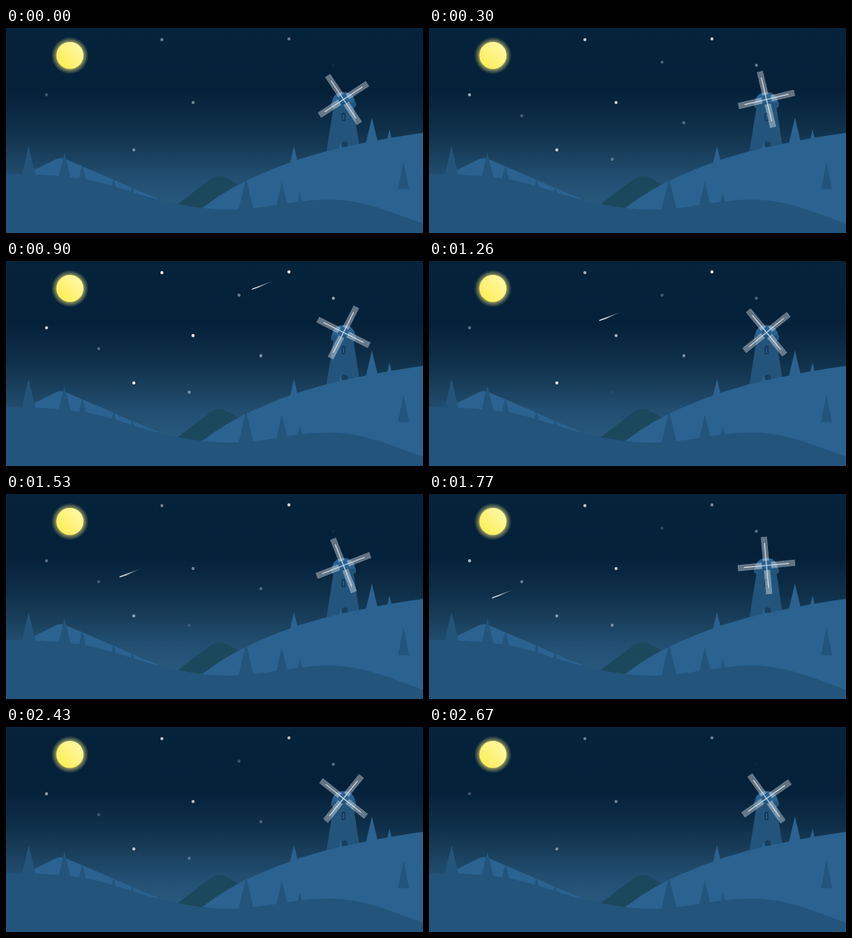
Write an HTML page that moves like this. It is 535 px wide and 264 px high and loops after 2.7 s.

```html
<!DOCTYPE html>
<html lang="en">
<head>
<meta charset="utf-8">
<title>Windmill at night</title>
<style>
html, body { margin: 0; width: 100%; height: 100%; overflow: hidden; background: #05223a; }
svg { display: block; width: 100vw; height: 100vh; }
</style>
</head>
<body>
<svg viewBox="0 0 535 264" preserveAspectRatio="none">
  <defs>
    <linearGradient id="sky" gradientUnits="userSpaceOnUse" x1="0" y1="0" x2="0" y2="240">
      <stop offset="0" stop-color="#05233b"/>
      <stop offset=".34" stop-color="#05213a"/>
      <stop offset=".54" stop-color="#0f304a"/>
      <stop offset=".67" stop-color="#193f5c"/>
      <stop offset=".8" stop-color="#224e70"/>
      <stop offset=".89" stop-color="#255579"/>
      <stop offset="1" stop-color="#2b5a7e"/>
    </linearGradient>
    <radialGradient id="glow">
      <stop offset=".7" stop-color="#f5e96a" stop-opacity=".65"/>
      <stop offset=".86" stop-color="#d9d27a" stop-opacity=".3"/>
      <stop offset="1" stop-color="#d9d27a" stop-opacity="0"/>
    </radialGradient>
    <linearGradient id="moon" x1=".85" y1=".2" x2=".15" y2=".85">
      <stop offset="0" stop-color="#fff7a0"/>
      <stop offset="1" stop-color="#fdee58"/>
    </linearGradient>
    <linearGradient id="trail" gradientUnits="userSpaceOnUse" x1="0" y1="0" x2="29" y2="-11.5">
      <stop offset="0" stop-color="#fff"/>
      <stop offset=".35" stop-color="#fff" stop-opacity=".75"/>
      <stop offset="1" stop-color="#fff" stop-opacity=".05"/>
    </linearGradient>
    <pattern id="mesh" width="2" height="2" patternUnits="userSpaceOnUse">
      <path d="M0 .5H2M.5 0V2" stroke="#fff" stroke-width=".7" stroke-opacity=".35"/>
    </pattern>
    <g id="blade">
      <rect x="-4" y="-37" width="8" height="31" fill="#fff" fill-opacity=".19"/>
      <rect x="-4" y="-37" width="8" height="31" fill="url(#mesh)"/>
      <path d="M0 0V-29" stroke="#e3ecf3" stroke-width="1.2" stroke-opacity=".85"/>
    </g>
  </defs>

  <rect width="535" height="264" fill="url(#sky)"/>
  <g id="stars" fill="#fff"></g>
  <path id="meteor" d="M-.6 .9Q-1 -.1 .2 -.6L29 -11.6L8 -2Z" fill="url(#trail)"/>
  <circle cx="82" cy="35.5" r="24" fill="url(#glow)"/>
  <circle cx="82" cy="35.3" r="17.4" fill="url(#moon)"/>

  <path d="M30 186L62 170Q70 165 79 170L135 194Q170 210 196 220L180 230L30 200Z" fill="#2b628f"/>
  <path d="M215 231L262 195Q273 187 285 194L310 208L260 240Z" fill="#1c485e"/>
  <g id="light" fill="#2b628f"></g>

  <g>
    <path d="M421 96H445L454 156L410.500 163Z" fill="#23547b"/>
    <path d="M418 97Q419 83 433 82.500Q447 83 448 97Z" fill="#2b628f"/>
    <path d="M417 96H449V100Q449 103 445 103H421Q417 103 417 100Z" fill="#23547b"/>
    <path d="M430.500 120V111.500Q430.500 109 433 109Q435.500 109 435.500 111.500V120Z" fill="#14395a"/>
    <path d="M432.300 118.500V111.500H433.700V118.500Z" fill="#2b628f"/>
    <path d="M430.500 153V149Q431 146 434.500 146Q438 146 438.500 149V153Z" fill="#173f60"/>
  </g>
  <path d="M248 235Q278 210 320 191Q380 164 440 152Q490 141 535 135V264H248Z" fill="#2b628f"/>
  <path d="M427 156L429.300 146L431.800 156Z" fill="#2b628f"/>
  <g id="dark" fill="#23547b"></g>
  <path d="M503 207.500L510 172L517 207.500Z" fill="#23547b"/>
  <path d="M0 188Q45 188 80 192C125 196 155 211 195 221C235 231 265 234 288 234C335 233 370 221 416 221C460 221 500 240 535 252V264H0Z" fill="#23547b"/>

  <g id="sails"></g>
</svg>
<script>
const LOOP = 2700;
const $ = id => document.getElementById(id);

function add(parent, tag, attrs) {
  const el = document.createElementNS("http://www.w3.org/2000/svg", tag);
  for (const key in attrs) el.setAttribute(key, attrs[key]);
  parent.appendChild(el);
  return el;
}

// All trees share one cone; the hills in front hide their feet.
const plant = (id, tips) => tips.forEach(([x, y]) =>
  add($(id), "path", { d: `M${x} ${y}l10.300 44h-20.600Z` }));
plant("light", [[369.5, 152], [469.5, 115], [492, 130.5]]);
plant("dark", [[29, 152], [75, 160], [98, 176], [138, 193], [162, 203], [308, 193], [354, 198], [377, 212]]);

for (let turn = 0; turn < 360; turn += 90)
  add($("sails"), "use", { href: "#blade", transform: `rotate(${turn})` });

// Each star dims at the loop's seam and once more at its own time.
const stars = [
  { x: 200, y: 15, peak: 1, dim: 1480 },
  { x: 363, y: 14, peak: 1, dim: 1880 },
  { x: 52, y: 86, peak: .85, dim: 1400 },
  { x: 240, y: 96, peak: 1, dim: 1480 },
  { x: 164, y: 157, peak: 1, dim: 1670 },
  { x: 235, y: 169, peak: .5, dim: 1350 },
  { x: 299, y: 44, peak: .42, dim: 1550 },
  { x: 420, y: 48, peak: .62, dim: 1500 },
  { x: 119, y: 113, peak: .4, dim: 1250 },
  { x: 327, y: 122, peak: .5, dim: 1800 }
];
for (const s of stars) s.el = add($("stars"), "circle", { cx: s.x, cy: s.y, r: 1.95 });

const dip = (t, at) => Math.exp(-(((t - at) / 300) ** 2));

function glow({ peak, dim }, t) {
  const depth = Math.min(1, 1.57 - peak);
  const dark = dip(t, 0) + dip(t, LOOP) + dip(t, dim);
  return peak * Math.max(0, 1 - depth * dark);
}

function draw(t) {
  $("sails").setAttribute("transform", `translate(433 92) rotate(${180 * t / LOOP - 33.3})`);
  const x = 316 - 0.2697 * (t - 900), y = 36 + 0.1122 * (t - 900);
  $("meteor").setAttribute("transform", `translate(${x} ${y})`);
  for (const s of stars) s.el.setAttribute("opacity", glow(s, t));
}

let start;
function tick(now) {
  start ??= now;
  draw((now - start) % LOOP);
  requestAnimationFrame(tick);
}
draw(0);
requestAnimationFrame(tick);
</script>
</body>
</html>
```
